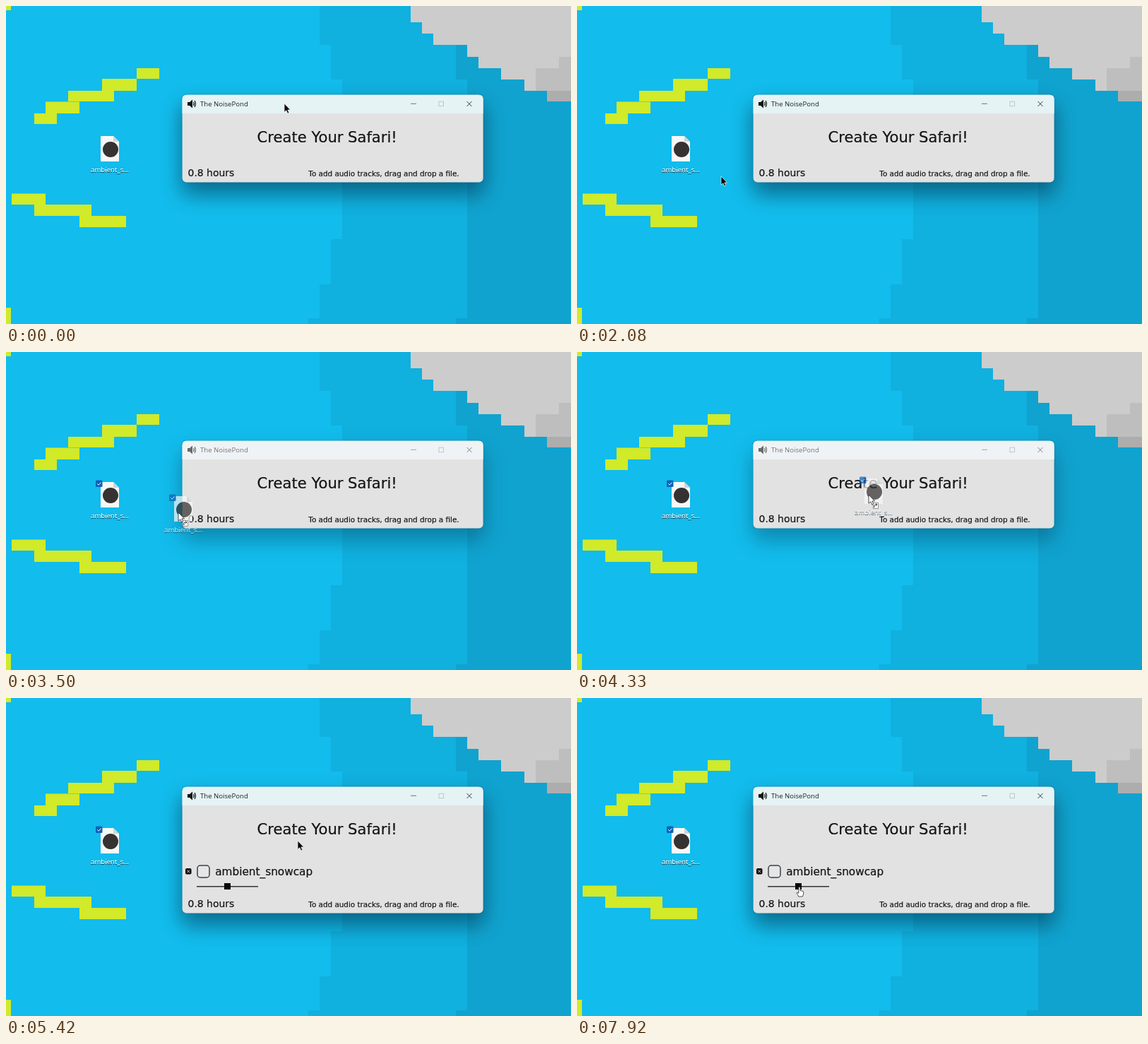
An HTML page that plays this animation: 800 px wide and 450 px high, repeating every 8 s.

```html
<!DOCTYPE html>
<html lang="en">
<head>
<meta charset="utf-8">
<title>Drag and drop demo</title>
<style>
  html, body { margin: 0; width: 100%; height: 100%; overflow: hidden; background: #12bcec; }
  svg { display: block; width: 100%; height: 100%; }
  .soft path { filter: blur(.6px); }
  .ui { font-family: "Open Sans", "Noto Sans", sans-serif; font-size: 9.6px; }
  .app { font-family: "DejaVu Sans", sans-serif; fill: #141414; stroke: #141414; stroke-width: .2; }
  .label { fill: #fff; stroke: #fff; stroke-width: .2; text-anchor: middle;
    filter: drop-shadow(.5px 1px .7px rgba(0, 30, 45, .95)); }
</style>
</head>
<body>
<svg viewBox="0 0 800 450">
  <defs>
    <g id="file">
      <path d="M134 184H152L160 192V220H134Z" fill="#f7f7f7"/>
      <path d="M152 184V192H160Z" fill="#cfd3d6"/>
      <circle cx="148" cy="203" r="11" fill="#363231"/>
    </g>
    <g id="tick">
      <rect x="127" y="181.5" width="9.5" height="9.5" rx="1.5" fill="#0b63bb"/>
      <path d="M129.3 186.4L131.2 188.2L134.4 184.6" fill="none" stroke="#fff"/>
    </g>
  </defs>

  <!-- Wallpaper, drawn past the stage so that only inner edges look soft -->
  <rect width="800" height="450" fill="#12bcec"/>
  <g class="soft">
    <path fill="#10b0df" d="M444 -9V55H460V104H476V330H460V394H444V442H428V459H809V-9Z"/>
    <path fill="#10a3cf" d="M637 55V104H653V442H637V459H809V55Z"/>
    <path fill="#cccccc" d="M573 -9V23H589V39H605V55H653V72H669V88H701V104H734V120H766V135H809V-9Z"/>
    <path fill="#bebebe" d="M750 120V88H783V72H809V120Z"/>
    <path fill="#adadad" d="M766 120H809V135H766Z"/>
    <path fill="#d1ea29" d="M185 88h32v15h-32z M136 103h49v17h-49z M88 120h65v15h-65z M56 135.5h48v16.5h-48z
      M40 152h32v15h-32z M8 265.5h48v15.5h-48z M40 281h81v16h-81z M104 297h66v16h-66z
      M-9 -9h16v15h-16z M-9 427h16v32h-16z"/>
  </g>

  <!-- Desktop file -->
  <rect id="highlight" x="114.5" y="181" width="65.5" height="72.5" fill="#fff"/>
  <use href="#file"/>
  <use href="#tick" id="checked"/>
  <text id="shortName" class="ui label" x="147" y="235">ambient_s...</text>
  <g id="longName" class="ui label">
    <text x="147" y="235">ambient_sno</text>
    <text x="147" y="250">wcap.mp3</text>
  </g>

  <!-- App window -->
  <g id="win">
    <rect id="body" x="249.6" y="125.8" width="426" height="123.7" rx="6" fill="#e2e2e2"/>
    <path id="bar" d="M249.6 152V131.8Q249.6 125.8 255.6 125.8H669.6Q675.6 125.8 675.6 131.8V152Z"/>
    <g id="caption" class="ui">
      <path d="M257 136H260L264 132.5V144.5L260 141H257Z" fill="#111"/>
      <path d="M265.5 136Q267.3 138.5 265.5 141M267 134.2Q270 138.5 267 142.8" fill="none" stroke="#111" stroke-width="1.2"/>
      <text x="275" y="142.2" fill="#222">The NoisePond</text>
      <path d="M573 138.3H581" stroke="#555" stroke-width=".8"/>
      <path d="M652.5 135L659.5 142M659.5 135L652.5 142" stroke="#222" stroke-width=".9"/>
    </g>
    <rect id="maximize" x="613" y="135.2" width="6.5" height="6.5" fill="none" stroke-width=".9"/>
    <text class="app" x="355.6" y="193.2" font-size="21.1">Create Your Safari!</text>
    <g id="track">
      <rect x="254" y="241" width="8.5" height="8.5" rx="2" fill="#0c0c0c"/>
      <path d="M256.4 243.4L260.2 247.2M260.2 243.4L256.4 247.2" stroke="#ddd" stroke-width=".9"/>
      <rect x="271" y="237" width="17" height="17" rx="4" fill="#e5e6e7" stroke="#3b4248" stroke-width="1.5"/>
      <text class="app" x="296.2" y="251.4" font-size="15.3">ambient_snowcap</text>
      <path d="M270 266.7H357" stroke="#333" stroke-width="1.5"/>
      <rect x="309" y="262" width="9" height="9" fill="#050505"/>
    </g>
    <g id="footer" class="app">
      <text x="257.6" y="241.2" font-size="13.9">0.8 hours</text>
      <text x="428.3" y="241.2" font-size="10.4">To add audio tracks, drag and drop a file.</text>
    </g>
  </g>

  <!-- Dragged copy and pointer -->
  <g id="ghost" opacity=".72">
    <use href="#file"/>
    <use href="#tick"/>
    <text class="ui label" x="147" y="235">ambient_s...</text>
  </g>
  <g id="pointer">
    <path id="arrow" d="M0 0V12.3L2.8 9.8L4.8 14L6.8 13L4.9 9H8.6Z" stroke-width=".8"/>
    <g id="badge">
      <rect x="6.5" y="11.5" width="7" height="8" fill="#fff" stroke="#555" stroke-width=".6"/>
      <path d="M8 18V15.5Q8 14 10 14H12M10.3 12.5L12 14L10.3 15.5" fill="none" stroke="#222"/>
    </g>
    <path id="hand" fill="#fff" stroke="#222" stroke-width=".8" stroke-linejoin="round"
      d="M-1.2 0Q0 -1.4 1.1 0V4.5L5 5.4Q6 5.8 5.8 8Q5.6 10.8 4.2 13H-1.3Q-2 10.5 -4.2 8.2Q-4.2 6.4 -1.2 8.3Z"/>
  </g>
</svg>

<script>
const LOOP = 8000, STEP = 1000 / 12;
const DRAG_START = 3050, DROP = 4450, CLOSE = 4560, OPEN = 4740, GROW = 5040;
const GRAB = [140, 207], EXTRA = 55;

// Pointer stops: time, x, y
const STOPS = [
  [0, 394, 138], [700, 394, 138], [1950, 204, 241], [2200, 204, 241], [2800, 140, 207],
  [DRAG_START, 140, 207], [3500, 244, 227], [4200, 413, 202], [5650, 413, 202],
  [6580, 273, 216], [7500, 315, 268], [LOOP, 315, 268]
];

const el = id => document.getElementById(id);
const show = (id, on) => el(id).style.display = on ? '' : 'none';
const set = (id, name, value) => el(id).setAttribute(name, value);
const clamp = v => Math.max(0, Math.min(1, v));
const smooth = p => p * p * (3 - 2 * p);

function pointerAt(t) {
  const i = STOPS.findIndex(stop => stop[0] > t);
  const [t0, x0, y0] = STOPS[i - 1], [t1, x1, y1] = STOPS[i];
  const p = smooth((t - t0) / (t1 - t0));
  return [x0 + (x1 - x0) * p, y0 + (y1 - y0) * p];
}

function drawFile(t, x, y) {
  const hover = t < DRAG_START && x > 114 && x < 180 && y > 181 && y < 253;
  const focused = t >= CLOSE && t < GROW;
  show('highlight', hover || focused);
  set('highlight', 'opacity', focused ? .22 : .17);
  show('checked', hover || t >= DRAG_START);
  show('shortName', !focused);
  show('longName', focused);
}

function drawWindow(t) {
  const inactive = t >= DRAG_START && t < CLOSE;
  const grown = t >= GROW;
  const visible = t < OPEN ? 1 - clamp((t - CLOSE) / 120) : clamp((t - OPEN) / 190);
  const scale = .945 + .055 * visible;
  const shift = 2.5 * (visible - 1);
  const win = el('win');
  win.setAttribute('opacity', visible);
  win.setAttribute('transform', `translate(${462.5 + shift} 187.5) scale(${scale}) translate(-462.5 -187.5)`);
  win.style.filter = `drop-shadow(0 16px 15px rgba(0,25,45,${inactive ? .28 : .44})) drop-shadow(0 0 1px rgba(0,30,45,.25))`;
  set('body', 'height', 123.7 + (grown ? EXTRA : 0));
  set('bar', 'fill', inactive ? '#f0f3f5' : '#e5f3f5');
  set('caption', 'opacity', inactive ? .6 : 1);
  set('maximize', 'stroke', t >= OPEN && !grown ? '#222' : '#b8c3c6');
  show('track', grown);
  set('footer', 'transform', `translate(0 ${grown ? EXTRA : 0})`);
}

function drawPointer(t, x, y) {
  const dragging = t >= DRAG_START && t < DROP;
  const overControl = t > GROW && y > 237;
  show('ghost', dragging);
  set('ghost', 'transform', `translate(${x - GRAB[0]} ${y - GRAB[1]})`);
  set('pointer', 'transform', `translate(${x} ${y})`);
  show('arrow', !overControl);
  show('hand', overControl);
  show('badge', dragging);
  set('arrow', 'fill', dragging ? '#fff' : '#050505');
  set('arrow', 'stroke', dragging ? '#222' : '#eee');
}

function frame() {
  const t = Math.floor((performance.now() % LOOP + 4) / STEP) * STEP % LOOP;
  const [x, y] = pointerAt(t);
  drawFile(t, x, y);
  drawWindow(t);
  drawPointer(t, x, y);
  requestAnimationFrame(frame);
}
frame();
</script>
</body>
</html>
```
